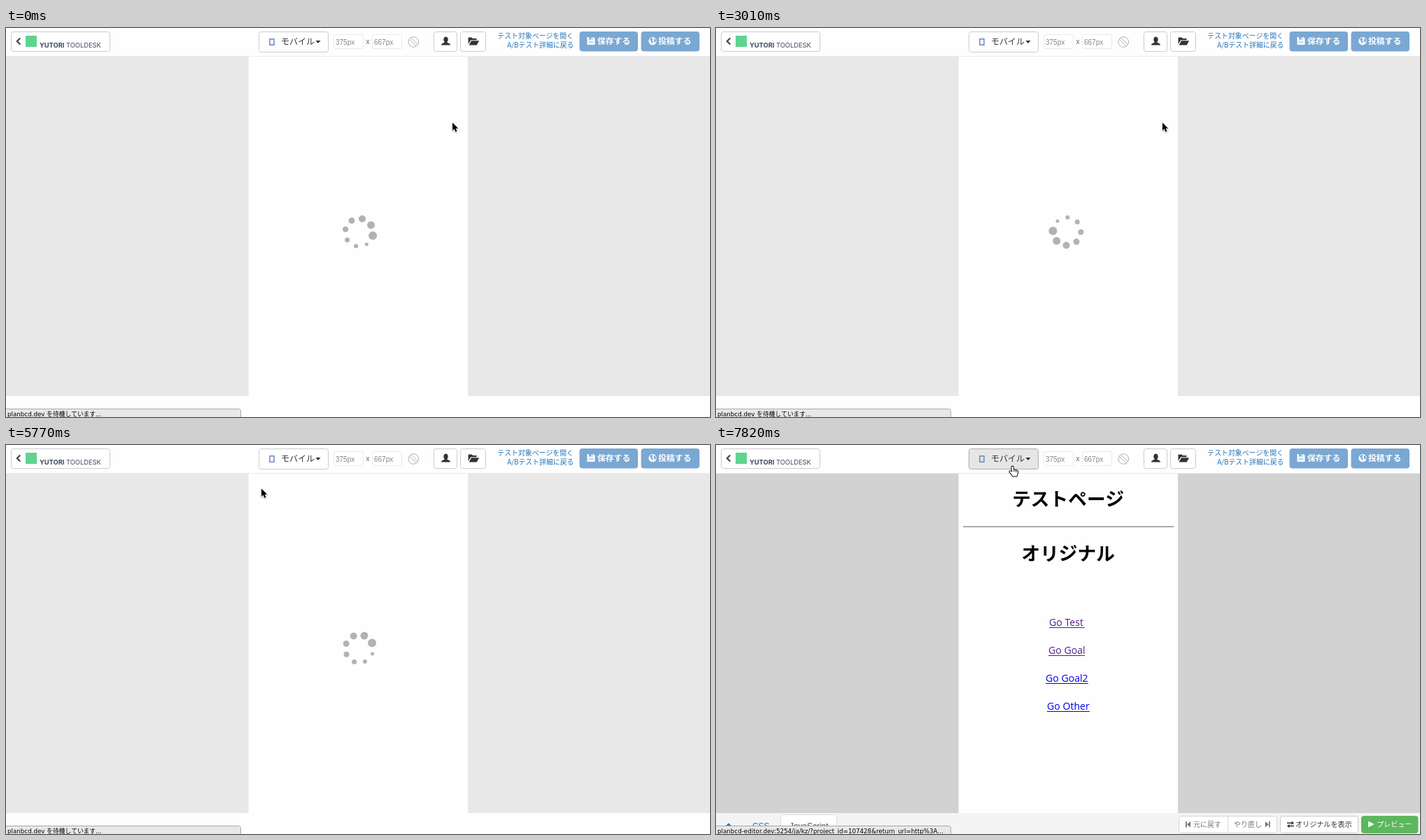
Recreate the animation shown at these times as an HTML page with a canvas. Size 1006 by 557 pixels, loop 8 s.

```html
<!DOCTYPE html>
<html lang="ja">
<head>
<meta charset="utf-8">
<title>Editor loading</title>
<style>
html, body { margin: 0; width: 100%; height: 100%; overflow: hidden; background: #fff; }
canvas { display: block; }
</style>
</head>
<body>
<canvas id="stage" width="1006" height="557"></canvas>
<script>
const ctx = document.getElementById('stage').getContext('2d');
const LOOP = 8000;
const CJK = '"Noto Sans CJK JP", "Noto Sans CJK", sans-serif';
const SANS = '"Liberation Sans", sans-serif';
const UI = '"DejaVu Sans", "Noto Sans CJK JP", sans-serif';
const BLUE = '#7aa8d3', GREEN = '#5cb85c';

// Moments the page reaches each state
const PAGE_IN = 6160, LOADED = 6340, TOOLS_IN = 6480;

// Screen refreshes: first, last, count
const STEPS = [
  [0, 90, 2], [290, 920, 8], [1040, 1400, 5], [1490, 1900, 5], [1990, 2710, 9],
  [2830, 3550, 8], [3640, 4360, 9], [4450, 5180, 8], [5300, 6010, 7],
  [6160, 6340, 2], [6480, 6600, 2], [6780, 7560, 8], [7650, 7820, 3]
].flatMap(([a, b, n]) =>
  Array.from({ length: n }, (_, i) => Math.floor((a + (b - a) * i / (n - 1)) / 10) * 10));

// Pointer path: time, x, y
const PATH = [
  [0, 638, 135], [4540, 638, 135], [4750, 570, 125], [4950, 450, 104], [5180, 402, 95],
  [5300, 398, 92], [5770, 365, 62], [6010, 328, 32], [6690, 328, 32], [7000, 352, 30],
  [7300, 405, 25], [7560, 437, 21], [7820, 424, 31], [LOOP, 424, 31]
];

function pointerAt(t) {
  const i = PATH.findIndex(p => p[0] > t);
  const [t0, x0, y0] = PATH[i - 1], [t1, x1, y1] = PATH[i];
  const k = (t - t0) / (t1 - t0);
  return { x: Math.round(x0 + (x1 - x0) * k), y: Math.round(y0 + (y1 - y0) * k) };
}

function rect(x, y, w, h, color) {
  ctx.fillStyle = color;
  ctx.fillRect(x, y, w, h);
}

function box(x, y, w, h, fill, border, radius = 3) {
  ctx.beginPath();
  ctx.roundRect(x + .5, y + .5, w - 1, h - 1, radius);
  ctx.fillStyle = fill;
  ctx.fill();
  ctx.lineWidth = 1;
  ctx.strokeStyle = border;
  ctx.stroke();
}

function text(str, x, y, size, color, family = CJK, weight = 'normal', align = 'left') {
  ctx.font = `${weight} ${size}px ${family}`;
  ctx.textAlign = align;
  ctx.fillStyle = color;
  ctx.fillText(str, x, y);
}

function shape(d, color) {
  ctx.fillStyle = color;
  ctx.fill(new Path2D(d));
}

function line(d, color, width) {
  ctx.strokeStyle = color;
  ctx.lineWidth = width;
  ctx.stroke(new Path2D(d));
}

function disc(x, y, r, color) {
  ctx.beginPath();
  ctx.arc(x, y, r, 0, Math.PI * 2);
  ctx.fillStyle = color;
  ctx.fill();
}

function header(hover) {
  rect(0, 0, 1006, 40, '#fefefe');
  rect(0, 40, 1006, 1, '#ececec');

  box(7, 5, 142, 29, '#fff', '#ccc');
  line('M20.3 14.5 15.8 19l4.5 4.5', '#444', 2.2);
  rect(28, 11, 16, 16, '#5fd490');
  text('YUTORI', 48, 27.5, 9.3, '#3c4660', 'Inter, sans-serif', 'bold');
  text('TOOLDESK', 86, 27.5, 9.3, '#3c4660', 'Inter, sans-serif');

  box(361, 5, 100, 30, hover ? '#e6e6e6' : '#fff', hover ? '#adadad' : '#ccc');
  line('M377 15.8h6v8.4h-6z', '#6b86bd', 1.5);
  text('モバイル', 393, 24, 12, '#333');
  shape('M442.5 18h7l-3.5 4z', '#333');

  box(468, 9, 43, 21, '#fff', '#eaeaea', 1);
  box(523, 9, 43, 21, '#fff', '#eaeaea', 1);
  text('375px', 471, 23.5, 10, '#858585', SANS);
  text('667px', 526, 23.5, 10, '#858585', SANS);
  text('x', 514.5, 23, 10, '#666', SANS);
  line('M575 20a7.3 7.3 0 1 0 14.6 0a7.3 7.3 0 1 0-14.6 0M576.3 16 586.3 26M578.6 13.8 588.6 23.8', '#b0b0b0', 1);

  box(611, 5, 34, 29, '#fff', '#ccc');
  shape('M625.3 16.5c0-5.5 6.4-5.5 6.4 0 0 1.8-.8 2.8-1.5 3.5.5 2 4.8 1.3 4.8 4.5h-13c0-3.2 4.3-2.5 4.8-4.5-.7-.7-1.5-1.7-1.5-3.5z', '#333');
  box(649, 5, 37, 29, '#fff', '#ccc');
  shape('M660.5 23v-8.5a1 1 0 0 1 1-1h4l1.5 1.5h5.5v2.2h-8.3zM661.5 24.5 665 18.2h11l-3.3 6.3z', '#333');

  text('テスト対象ページを開く', 811, 15, 9.9, '#2574b8', CJK, 'normal', 'right');
  text('A/Bテスト詳細に戻る', 811.5, 28, 9.9, '#2574b8', CJK, 'normal', 'right');

  box(819.5, 5, 83.5, 28.5, BLUE, BLUE);
  shape('M830.5 13h9l2 2v9h-11z', '#fff');
  rect(833, 13, 5.5, 3.5, BLUE);
  rect(836.3, 13.5, 1.4, 2.5, '#fff');
  rect(832.7, 19.5, 6.6, 1, BLUE);
  text('保存する', 845, 23.3, 11.8, '#fff', CJK, 'bold');

  box(907.5, 5, 83.5, 28.5, BLUE, BLUE);
  disc(924, 18.7, 5.6, '#fff');
  shape('M920 16l3-2.2 1.5 1.5-1.5 2.4 1.7 1.3-1 3.4-1.6-2.5zM926 15l2.2 1 .6 3.5-1.9 1.5-1.2-2.7z', BLUE);
  text('投稿する', 932, 23.3, 11.8, '#fff', CJK, 'bold');
}

function link(str, x, y, width, color) {
  text(str, x, y, 14.1, color, '"Open Sans", sans-serif');
  rect(x, y + 2, width, 1, color);
}

function page() {
  text('テストページ', 503.2, 87, 26.7, '#000', CJK, 'bold', 'center');
  rect(353, 116, 301, 1, '#a2a2a2');
  rect(353, 117, 301, 1, '#b4b4b4');
  text('オリジナル', 503.2, 165, 26.7, '#000', CJK, 'bold', 'center');
  link('Go Test', 476, 259, 51, '#551a8b');
  link('Go Goal', 475, 299, 52, '#551a8b');
  link('Go Goal2', 471, 339, 61, '#0000ee');
  link('Go Other', 473, 379, 61, '#0000ee');
}

function toolbar() {
  rect(0, 527, 1006, 30, '#f4f4f4');
  line('M13.5 547.5 18 543l4.5 4.5', '#2574b8', 2.4);
  text('CSS', 52, 549.5, 11.9, '#2574b8', SANS);
  box(92, 529, 81, 32, '#fff', '#ddd');
  text('JavaScript', 105, 549.5, 11.9, '#555', SANS);

  box(661, 531, 141, 25, '#fff', '#d5d5d5');
  rect(731, 531, 1, 25, '#d5d5d5');
  shape('M671 539h1.8v8.5h-1.8zM678 539v8.5l-5-4.25z', '#777');
  text('元に戻す', 682, 547, 10, '#777');
  text('やり直し', 740, 547, 10, '#777');
  shape('M790 539h1.8v8.5h-1.8zM784.8 539v8.5l5-4.25z', '#777');

  box(806, 531, 112, 25, '#fff', '#ccc');
  line('M816 541.2h7M819 545.5h7', '#333', 1.4);
  shape('M822.5 538.4v5.6l3.5-2.8zM819.5 542.7v5.6l-3.5-2.8z', '#333');
  text('オリジナルを表示', 828, 547, 10.1, '#333');

  box(922, 531, 81.5, 25, GREEN, GREEN);
  shape('M932 538.5v9l8.5-4.5z', '#fff');
  text('プレビュー', 944, 547, 10.1, '#fff');
}

function status(str) {
  box(-4, 545, 340, 18, '#e8e8e8', '#a8a8a8');
  text(str, 2, 556, 8.72, '#000', UI);
}

// Eight shrinking dots turning about a slightly off-centre pivot
function spinner(t) {
  const head = (12.8 + t * .1808) * Math.PI / 180;
  const lean = head + Math.PI / 10;
  const cx = 503.1 + 1.75 * Math.cos(lean);
  const cy = 291.9 + 1.75 * Math.sin(lean);
  for (let i = 0; i < 8; i++) {
    const a = head - i * Math.PI / 4;
    disc(cx + 20 * Math.cos(a), cy + 20 * Math.sin(a), 6 - i * .5, '#b2b2b2');
  }
}

function pointer({ x, y }, hand) {
  const d = hand
    ? 'M3.6 1.6Q4.6-.2 5.8 1.5L6.3 5.6Q7.7 4.8 8.3 6Q9.6 5.3 10.2 6.7Q11.8 6.3 12 8L11.3 11.3 10.6 14H5L3.7 11.7.7 8.5Q.5 6.8 2.3 7.2L4.2 8.8Z'
    : 'M0 0V12.2L2.8 9.6 4.8 14.2 6.9 13.3 5 8.9H8.7Z';
  const p = new Path2D(d);
  const scale = hand ? 1.05 : .93;
  ctx.save();
  ctx.translate(hand ? x - 5.3 : x, hand ? y - 1.3 : y + .5);
  ctx.scale(scale, scale);
  ctx.lineJoin = 'round';
  ctx.shadowColor = 'rgba(0,0,0,.35)';
  ctx.shadowBlur = 2;
  ctx.shadowOffsetY = 1;
  ctx.lineWidth = hand ? 1.6 : 1.4;
  ctx.strokeStyle = hand ? '#000' : '#fff';
  ctx.stroke(p);
  ctx.shadowColor = 'transparent';
  ctx.fillStyle = hand ? '#fff' : '#000';
  ctx.fill(p);
  if (hand) line('M6.3 5.6V8M8.3 6.2V8.2M10.2 6.9V8.6', '#000', .8);
  ctx.restore();
}

function draw(now) {
  const clock = now % LOOP;
  const t = STEPS.filter(s => s <= clock).pop();
  const at = pointerAt(t);
  const hover = t > TOOLS_IN && at.x >= 361 && at.y < 35;

  rect(0, 0, 1006, 557, '#fefefe');
  const side = t < TOOLS_IN ? '#e8e8e8' : '#d2d2d2';
  rect(0, 41, 346.6, 486, side);
  rect(660, 41, 346, 486, side);
  header(hover);
  if (t >= PAGE_IN) page();
  if (t < LOADED) spinner(t);
  if (t >= TOOLS_IN) toolbar();
  if (t < LOADED) status('planbcd.dev を待機しています...');
  if (hover) status('planbcd-editor.dev:5254/ja/kz/?project_id=107428&return_url=http%3A...');
  pointer(at, hover);
}

const start = performance.now();
function tick() {
  draw(performance.now() - start);
  requestAnimationFrame(tick);
}
tick();
</script>
</body>
</html>
```
